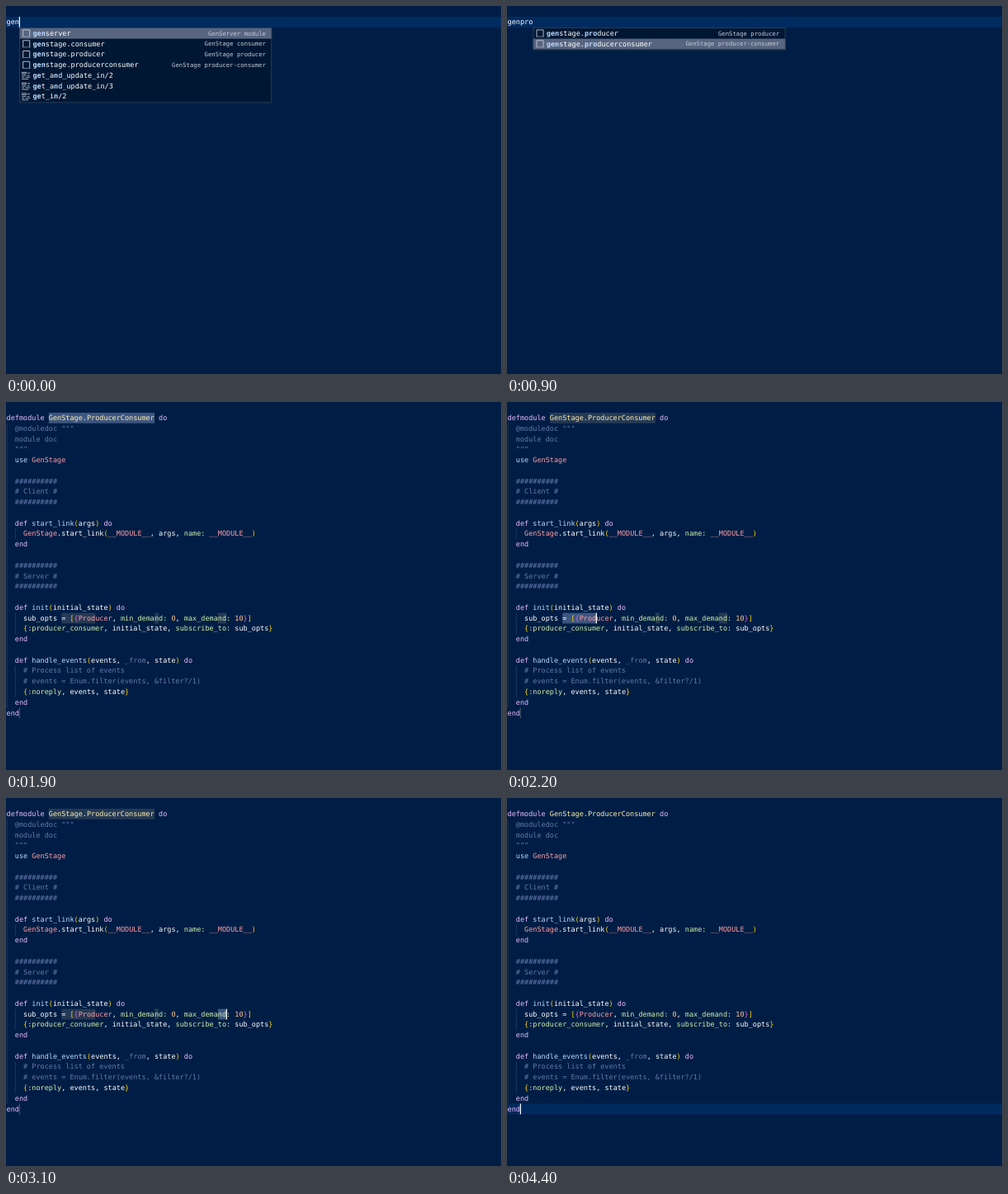
Recreate the animation shown at these times as an HTML page with a canvas. Size 600x446 px, loop 4500 ms.

```html
<!DOCTYPE html>
<html>
<head>
<meta charset="utf-8">
<style>
  html, body { margin: 0; width: 100%; height: 100%; overflow: hidden; background: #001e45; }
  canvas { display: block; }
</style>
</head>
<body>
<canvas id="stage" width="600" height="446"></canvas>
<script>
const ctx = document.getElementById('stage').getContext('2d');
const CHAR = 5.125, LINE = 12.77, LEFT = 0.6, TOP = 13, LOOP = 4500;
const MONO = '"DejaVu Sans Mono", monospace';
const COLOR = {
  bg: '#001e45', line: '#002b60', text: '#ffffff', keyword: '#ebbbff', func: '#bbdaff',
  comment: '#6478ab', red: '#ff9da4', yellow: '#ffeead', green: '#d1f1a9', number: '#ffc58f',
  guide: '#22395f', stop: '#253a55', selected: '#3d5680', popup: '#001733',
  active: '#586580', border: '#34455f', detail: '#c3cad6', icon: '#c5ccd8'
};
const BRACKETS = ['#ffd700', '#da70d6'];

const CODE = `defmodule GenStage.ProducerConsumer do
  @moduledoc """
  module doc
  """
  use GenStage

  ##########
  # Client #
  ##########

  def start_link(args) do
    GenStage.start_link(__MODULE__, args, name: __MODULE__)
  end

  ##########
  # Server #
  ##########

  def init(initial_state) do
    sub_opts = [{Producer, min_demand: 0, max_demand: 10}]
    {:producer_consumer, initial_state, subscribe_to: sub_opts}
  end

  def handle_events(events, _from, state) do
    # Process list of events
    # events = Enum.filter(events, &filter?/1)
    {:noreply, events, state}
  end
end`.split('\n');

const RULES = [
  [/^(#.*|@moduledoc.*|module doc|"""|_from\b)/, 'comment'],
  [/^GenStage\.ProducerConsumer/, 'yellow'],
  [/^(GenStage|Producer|__MODULE__)\b/, 'red'],
  [/^(defmodule|def|do|end)\b/, 'keyword'],
  [/^use\b/, 'func'],
  [/^(\w+:|:\w+)/, 'green'],
  [/^\d+/, 'number'],
  [/^(\w+|\s+|[^\w\s])/, 'text']
];

// Splits a line into [column, text, colour]
function tokenize(line) {
  const tokens = [];
  let depth = 0, col = 0;
  while (col < line.length) {
    const rest = line.slice(col);
    const [rule, kind] = RULES.find(([re]) => re.test(rest));
    const word = rest.match(rule)[0];
    let color = COLOR[kind];
    if ('([{'.includes(word)) color = BRACKETS[depth++ % 2];
    else if (')]}'.includes(word)) color = BRACKETS[--depth % 2];
    else if (kind === 'text' && line.slice(0, col).endsWith('def ')) color = COLOR.func;
    if (word.trim()) tokens.push([col, word, color]);
    col += word.length;
  }
  return tokens;
}
const TOKENS = CODE.map(tokenize);

// Snippet tab stops: row, column, length
const STOPS = [[0, 10, 25], [19, 13, 8], [19, 35, 1], [19, 50, 2], [28, 3, 0]];
const STOP_START = 1200, STOP_STEP = [1200, 2000, 2400, 2800, 3200];

const ITEMS = [
  ['genserver', 'GenServer module'],
  ['genstage.consumer', 'GenStage consumer'],
  ['genstage.producer', 'GenStage producer'],
  ['genstage.producerconsumer', 'GenStage producer-consumer'],
  ['get_and_update_in/2'], ['get_and_update_in/3'], ['get_in/2']
];

const xAt = col => LEFT + col * CHAR;
const yAt = row => TOP + row * LINE;

function box(x, y, w, h, color) {
  ctx.fillStyle = color;
  ctx.fillRect(x, y, w, h);
}

function write(str, x, y, color, size = 8.51, weight = '') {
  ctx.font = `${weight} ${size}px ${MONO}`;
  ctx.fillStyle = color;
  ctx.fillText(str, x, y);
}

const lineHighlight = row => box(0, yAt(row), 600, LINE, COLOR.line);

// Solid for half a second after each edit, then blinking
function caret(row, col, age) {
  if (age % 1000 < 500) box(Math.round(xAt(col)) - 0.2, yAt(row), 1.2, LINE, COLOR.text);
}

function snippetIcon(x, y) {
  ctx.strokeStyle = COLOR.icon;
  ctx.lineWidth = 0.9;
  ctx.beginPath();
  ctx.moveTo(x + 0.5, y + 8.5);
  ctx.lineTo(x + 0.5, y + 0.5);
  ctx.lineTo(x + 8.5, y + 0.5);
  ctx.lineTo(x + 8.5, y + 8.5);
  ctx.stroke();
  for (let i = 0; i < 9; i += 2) box(x + i, y + 8.2, 1.2, 0.9, COLOR.icon);
}

function keywordIcon(x, y) {
  ctx.strokeStyle = COLOR.icon;
  ctx.lineWidth = 0.8;
  ctx.strokeRect(x - 0.5, y + 0.8, 4.5, 1.8);
  [[5.5, 1.2, 3.5], [-1, 4.2, 5], [5.5, 4.2, 3], [-1, 6.3, 3], [3.5, 6.3, 5.5], [-1, 8.4, 8]]
    .forEach(([dx, dy, w]) => box(x + dx, y + dy, w, 0.8, COLOR.icon));
}

function popup(typed, items, active) {
  const x = xAt(typed.length) + 0.2, y = yAt(1) + 0.4, w = 306, h = items.length * LINE + 1.8;
  box(x, y, w, h, COLOR.popup);
  items.forEach(([name, detail], i) => {
    const top = y + 0.7 + i * LINE, base = top + 9;
    if (i === active) box(x, top, w, LINE, COLOR.active);
    (detail ? snippetIcon : keywordIcon)(x + 4, top + 1.6);
    let hit = 0;
    [...name].forEach((ch, k) => {
      const match = ch === typed[hit];
      if (match) hit++;
      write(ch, x + 16.3 + k * CHAR, base, match ? COLOR.func : COLOR.text, 8.51, match ? 'bold' : '');
    });
    if (detail) write(detail, x + 298.8 - detail.length * 4.38, base - 0.3, COLOR.detail, 7.27);
  });
  ctx.strokeStyle = COLOR.border;
  ctx.lineWidth = 0.8;
  ctx.strokeRect(x + 0.4, y + 0.4, w - 0.8, h - 0.8);
}

function drawTyping(t) {
  const typed = t < 300 ? 'gen' : t < 400 ? 'genp' : 'genpro';
  const items = t < 300 ? ITEMS : ITEMS.slice(2, 4);
  lineHighlight(0);
  write(typed, xAt(0), yAt(0) + 9, COLOR.text);
  caret(0, typed.length, t < 300 ? t : t < 400 ? t - 300 : t - 400);
  popup(typed, items, t < 900 ? 0 : 1);
}

function drawCode(t) {
  const stop = STOP_STEP.filter(s => t >= s).length - 1;
  const done = stop === STOPS.length - 1;
  if (done) lineHighlight(28);

  box(0.7, yAt(1), 0.9, 27 * LINE, COLOR.guide);
  [[11, 1], [19, 2], [24, 3]].forEach(([row, n]) =>
    box(xAt(2), yAt(row), 0.9, n * LINE, COLOR.guide));

  if (!done) {
    STOPS.forEach(([row, col, n], i) => {
      if (n) box(xAt(col), yAt(row), n * CHAR, LINE, i === stop ? COLOR.selected : COLOR.stop);
      else box(xAt(col) - 0.2, yAt(row), 1.2, LINE, '#465368');
    });
  }

  TOKENS.forEach((tokens, row) =>
    tokens.forEach(([col, word, color]) => write(word, xAt(col), yAt(row) + 9, color)));

  const [row, col, n] = STOPS[stop];
  caret(row, col + n, t - STOP_STEP[stop]);
}

function frame(now) {
  const t = Math.floor((now % LOOP) / 100) * 100;
  ctx.textRendering = 'geometricPrecision';
  box(0, 0, 600, 446, COLOR.bg);
  (t < STOP_START ? drawTyping : drawCode)(t);
  requestAnimationFrame(frame);
}
frame(performance.now());
</script>
</body>
</html>
```
